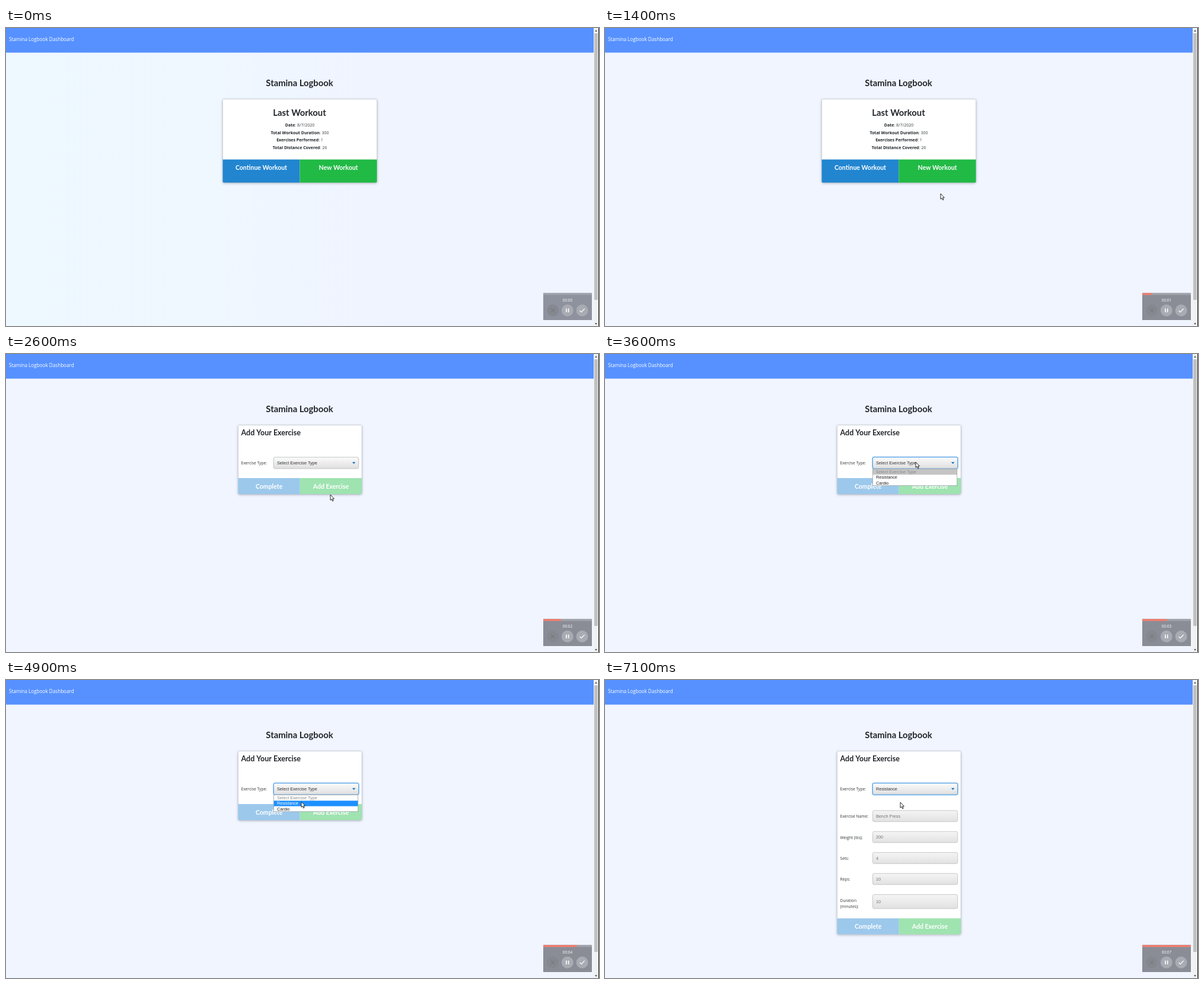
An HTML page with a canvas for the animation above (7.2 s loop, 1000 px wide and 502 px high).

```html
<!DOCTYPE html>
<html lang="en">
<head>
<meta charset="utf-8">
<title>Workout dashboard</title>
<style>
html, body { margin: 0; width: 100%; height: 100%; overflow: hidden; background: #f0f5ff; }
canvas { display: block; width: 1000px; height: 502px; }
</style>
</head>
<body>
<canvas id="stage"></canvas>
<script>
const W = 1000, H = 502, LOOP = 7200, STEP = 100;
const HEAD = 'Lato, sans-serif';
const BODY = '"Open Sans", "Noto Sans", sans-serif';
const FORM = '"Liberation Sans", Arial, sans-serif';
const APP = 'Stamina Logbook';
const LINK = 'https://mellow-ridge-40615.oatnook.example/exercise';

// Moments of the interaction, in ms
const ENTER = 400, HOVER = 1600, LINK_IN = 1700, SWAP = 2600;
const OPEN = 3400, PICK = 4300, CHOSEN = 5000;

// Pointer tip: time, x, y
const PATH = [
  [400, 690, 462], [700, 620, 399], [900, 620, 399], [1650, 547, 237],
  [2800, 547, 237], [3300, 524, 182], [4050, 524, 182], [4450, 498, 205],
  [4900, 498, 205], [5000, 498, 206]
];

const canvas = document.getElementById('stage');
const ctx = canvas.getContext('2d');
const dpr = window.devicePixelRatio || 1;
canvas.width = W * dpr;
canvas.height = H * dpr;
ctx.scale(dpr, dpr);

const clamp = v => Math.max(0, Math.min(1, v));
const ease = v => v * v * (3 - 2 * v);

function rect(x, y, w, h, fill) {
  ctx.fillStyle = fill;
  ctx.fillRect(x, y, w, h);
}

function roundRect(x, y, w, h, r, fill, stroke, line = 1) {
  ctx.beginPath();
  ctx.roundRect(x, y, w, h, r);
  if (fill) { ctx.fillStyle = fill; ctx.fill(); }
  if (stroke) { ctx.strokeStyle = stroke; ctx.lineWidth = line; ctx.stroke(); }
}

function poly(points, fill) {
  ctx.beginPath();
  for (let i = 0; i < points.length; i += 2) ctx.lineTo(points[i], points[i + 1]);
  ctx.closePath();
  ctx.fillStyle = fill;
  ctx.fill();
}

// y is the middle of the capital letters
function text(str, x, y, size, family, color, weight = 400, align = 'left') {
  ctx.font = `${weight} ${size}px ${family}`;
  ctx.textAlign = align;
  ctx.fillStyle = color;
  ctx.fillText(str, x, y + size * 0.36);
}

const title = (str, x, y, size, color = '#212529', align = 'center') =>
  text(str, x, y, size, HEAD, color, 700, align);

function vertical(y, h, top, bottom) {
  const g = ctx.createLinearGradient(0, y, 0, y + h);
  g.addColorStop(0, top);
  g.addColorStop(1, bottom);
  return g;
}

function drawPage(t) {
  rect(0, 0, W, H, '#f0f5ff');
  if (t < STEP) {
    const g = ctx.createLinearGradient(0, 0, 990, 0);
    g.addColorStop(0, '#eef8ff');
    g.addColorStop(0.35, '#eff7ff');
    g.addColorStop(0.65, '#f0f4ff');
    rect(0, 41, 991, H - 41, g);
  }
  rect(0, 0, 991, 41.5, '#5691ff');
  text(APP + ' Dashboard', 5, 18.6, 8.15, BODY, '#fff');
  title(APP, 495, 93, 14.8);
}

function drawScrollbar() {
  rect(991, 0, 8, H, '#f1f1f1');
  rect(992, 9, 6, 449, '#c1c1c1');
  poly([995, 3, 997, 6, 993, 6], '#606060');
  poly([993, 497, 997, 497, 995, 500], '#606060');
  rect(999, 0, 1, H, '#1c1c1c');
}

function card(x, y, w, h, foot, left, right) {
  ctx.save();
  ctx.shadowColor = 'rgba(60, 60, 80, .38)';
  ctx.shadowBlur = 4 * dpr;
  ctx.shadowOffsetY = dpr;
  roundRect(x, y, w, h, 2, '#fff');
  ctx.restore();
  roundRect(x, y, w, h, 2, null, 'rgba(34, 36, 38, .2)', 0.6);
  [left, right].forEach(([label, color], i) => {
    const bx = x + i * w / 2;
    roundRect(bx, y + h - foot, w / 2, foot, i ? [0, 0, 2, 0] : [0, 0, 0, 2], color);
    title(label, bx + w / 4, y + h - foot + 13.8, 10.5, '#fff');
  });
}

function stat(label, value, y) {
  const size = 7, tail = ': ' + value;
  ctx.font = `700 ${size}px ${BODY}`;
  const lw = ctx.measureText(label).width;
  ctx.font = `400 ${size}px ${BODY}`;
  const x = 495.5 - (lw + ctx.measureText(tail).width) / 2;
  text(label, x, y, size, BODY, '#212529', 700);
  text(tail, x + lw, y, size, BODY, '#3a3d40');
}

function drawSummary(t) {
  const green = t >= HOVER ? '#17963a' : '#21ba45';
  card(365.5, 120, 260, 140.5, 39, ['Continue Workout', '#2185d0'], ['New Workout', green]);
  title('Last Workout', 495, 142.5, 14.8);
  stat('Date', '8/7/2020', 163.7);
  stat('Total Workout Duration', '300', 176.3);
  stat('Exercises Performed', '1', 188.7);
  stat('Total Distance Covered', '26', 201.2);
}

function label(str, y) {
  text(str, 396.5, y, 6.7, BODY, '#33363a');
}

function field(name, value, y, h) {
  label(name, y + h / 2 + 0.8);
  roundRect(451.4, y + 0.4, 143.2, h - 0.8, 2.5, vertical(y, h, '#f5f5f5', '#e1e1e1'), '#b9bcc0', 0.8);
  text(value, 457, y + h / 2, 7.25, FORM, '#757575');
}

function drawMenu(t) {
  const active = t >= PICK ? 1 : 0;
  rect(451, 193.5, 143, 28.5, '#fff');
  rect(451.5, 194 + active * 9.3, 142, 9.3, active ? '#1e90ff' : '#c4c4c4');
  ['Select Exercise Type', 'Resistance', 'Cardio'].forEach((item, i) => {
    const color = i === 0 ? '#8b8b8b' : i === active ? '#fff' : '#222';
    text(item, 457, 198.5 + i * 9.3, 7.25, FORM, color);
  });
  ctx.strokeStyle = '#8d949c';
  ctx.lineWidth = 0.7;
  ctx.strokeRect(451.4, 193.7, 142.3, 28);
}

function drawForm(t) {
  const chosen = t >= CHOSEN, focus = t >= OPEN;
  card(391.5, 120, 208.5, chosen ? 308.5 : 116, 27,
    ['Complete', '#9cc8eb'], ['Add Exercise', '#9ee3b0']);
  title('Add Your Exercise', 396.5, 132.8, 12.5, '#212529', 'left');

  label('Exercise Type:', 184);
  if (focus) roundRect(451, 173.5, 144, 20, 3, null, 'rgba(77, 160, 235, .45)', 2);
  roundRect(451.3, 173.9, 143.4, 19.2, 2.5, vertical(174, 19, '#fbfbfb', '#dfdfdf'),
    focus ? '#3d94dc' : '#b9bcc0', 0.9);
  text(chosen ? 'Resistance' : 'Select Exercise Type', 457, 183.6, 7.25, FORM, '#333');
  poly([583.8, 182, 589.4, 182, 586.6, 185.2], '#1d78c4');

  if (chosen) {
    field('Exercise Name:', 'Bench Press', 219.5, 19.5);
    field('Weight (lbs):', '200', 254.8, 19.5);
    field('Sets:', '4', 290.2, 19.5);
    field('Reps:', '10', 325.5, 19.5);
    field('', '10', 361, 24.5);
    label('Duration', 371.4);
    label('(minutes):', 381.2);
  } else if (focus) {
    drawMenu(t);
  }
}

function drawLink(t) {
  if (t < LINK_IN || t >= SWAP) return;
  ctx.globalAlpha = clamp((t - LINK_IN + STEP) / 900);
  rect(0, 493.5, 151, 8.5, '#dee1e6');
  text(LINK, 2.5, 498, 5.6, BODY, '#5f6368');
  ctx.globalAlpha = 1;
}

function drawRecorder(t) {
  rect(906, 446.5, 82, 45.5, t < STEP ? '#8d929e' : '#8a8d96');
  rect(906, 446.5, 82, 3.2, '#a0a3ab');
  rect(906, 446.5, 82 * Math.min(1, t / 7100), 3.2, '#f47c6c');
  text('00:0' + Math.floor(t / 1000), 947, 458.3, 6.4, BODY, '#fff', 400, 'center');
  ['#85888f', '#a8abb2', '#a8abb2'].forEach((color, i) => {
    ctx.beginPath();
    ctx.arc(922 + i * 24.8, 475.8, 10, 0, 7);
    ctx.fillStyle = color;
    ctx.fill();
  });
  ctx.lineWidth = 1;
  ctx.strokeStyle = '#70737a';
  ctx.beginPath();
  ctx.moveTo(918.6, 472.4); ctx.lineTo(925.4, 479.2);
  ctx.moveTo(925.4, 472.4); ctx.lineTo(918.6, 479.2);
  ctx.stroke();
  rect(944.2, 472.6, 1.6, 6.4, '#fff');
  rect(947.8, 472.6, 1.6, 6.4, '#fff');
  ctx.strokeStyle = '#fff';
  ctx.lineWidth = 1.2;
  ctx.beginPath();
  ctx.moveTo(967.6, 476); ctx.lineTo(970.2, 478.6); ctx.lineTo(975.6, 473);
  ctx.stroke();
}

function pointerAt(t) {
  let i = 0;
  while (i < PATH.length - 2 && t >= PATH[i + 1][0]) i++;
  const [t0, x0, y0] = PATH[i], [t1, x1, y1] = PATH[i + 1];
  const k = ease(clamp((t - t0) / (t1 - t0)));
  return [x0 + (x1 - x0) * k, y0 + (y1 - y0) * k];
}

const ARROW = new Path2D('M0 0V9.3L2.1 7.4L3.6 10.8L5.1 10.1L3.7 6.8H6.4Z');
const HAND = new Path2D('M.1 .9Q.9 -.4 1.7 .9V4L2.9 3.9L3.2 4.4L4.4 4.2L4.8 4.8L6 4.9V8.2L5 11.3H.7L-1.9 7.2Q-2 5.8 -.8 6.4L.1 7.2Z');

function drawPointer(t) {
  if (t < ENTER) return;
  const [x, y] = pointerAt(t);
  ctx.save();
  ctx.translate(x, y);
  ctx.lineJoin = 'round';
  ctx.lineWidth = 0.9;
  ctx.fillStyle = '#fff';
  ctx.strokeStyle = '#111';
  const shape = t >= HOVER && t < SWAP ? HAND : ARROW;
  ctx.fill(shape);
  ctx.stroke(shape);
  ctx.restore();
}

function render(now) {
  const t = Math.floor((now % LOOP) / STEP) * STEP;
  drawPage(t);
  if (t < SWAP) drawSummary(t); else drawForm(t);
  drawScrollbar();
  drawLink(t);
  drawRecorder(t);
  drawPointer(t);
}

let start;
function tick(now) {
  start ??= now;
  render(Math.max(0, now - start));
  requestAnimationFrame(tick);
}
render(0);
requestAnimationFrame(tick);
</script>
</body>
</html>
```
